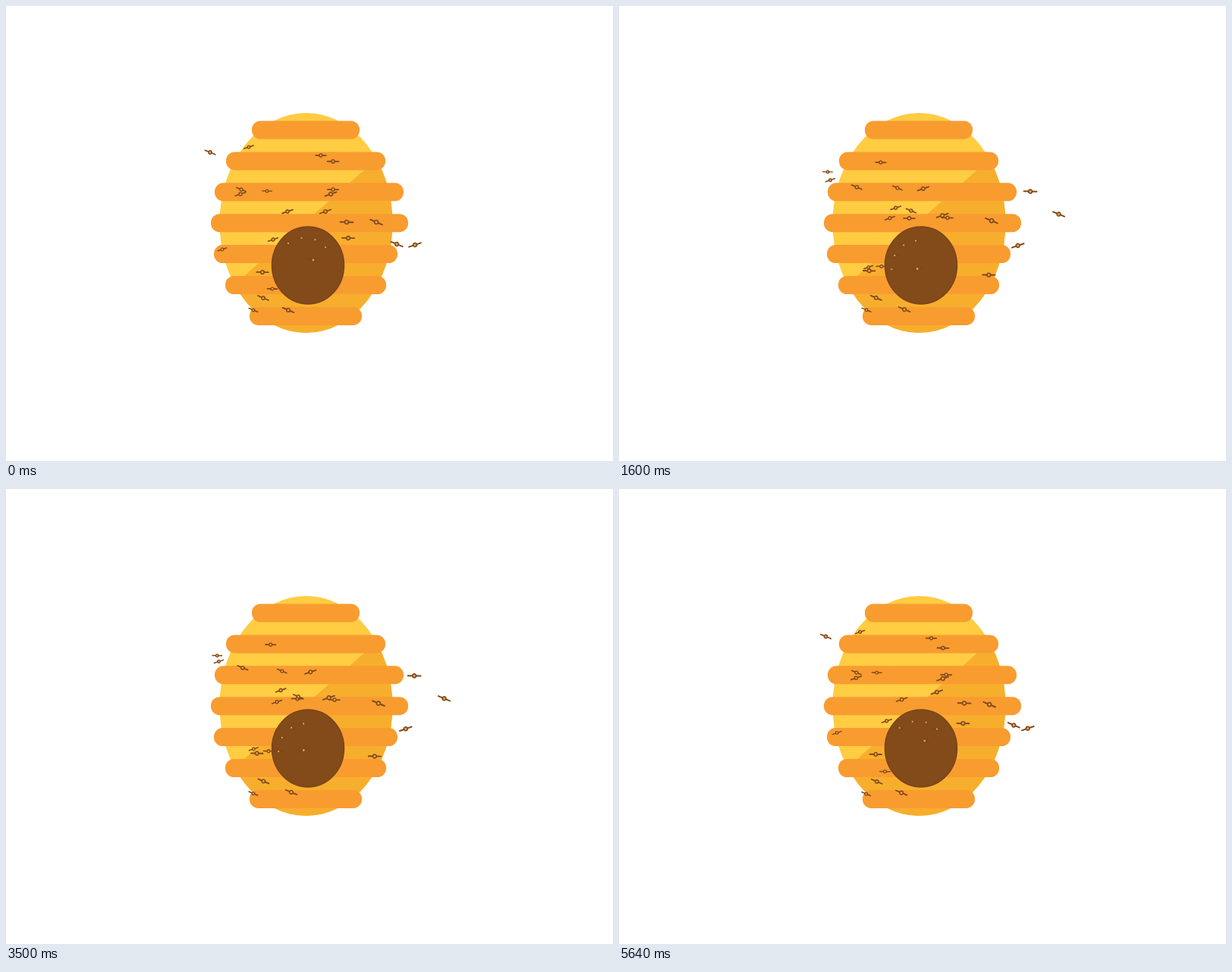
An HTML page with a canvas that plays this animation: 800x600 px, repeating every 5.66 s.

```html
<!DOCTYPE html>
<html lang="en">
<head>
<meta charset="utf-8">
<title>Beehive</title>
<style>
  html, body { margin: 0; width: 100%; height: 100%; overflow: hidden; background: #fff; }
  canvas { display: block; }
</style>
</head>
<body>
<canvas id="stage" width="800" height="600"></canvas>
<script>
const ctx = document.getElementById('stage').getContext('2d');
const LOOP = 5660, LAPS = 3, STEP = 20, TAU = Math.PI * 2;
const BROWN = '#7f4819';
const TILTS = [0.4, 0.02, -0.33];

// Left and right end of each band, from top to bottom.
const bands = [[324, 466], [290, 500], [275, 524], [270, 530], [274, 516], [289, 501], [321, 469]];

// Three points on each bee's orbit: at the start, 0.35 and 0.85 of a lap.
// Ordered from large to small; tilts repeat in threes.
const bees = [
  [488, 285, 486, 330, 491, 283], [449, 285, 449, 278, 541, 245], [539, 315, 498, 277, 526, 316],
  [515, 314, 453, 314, 579, 275], [451, 306, 448, 313, 487, 354], [428, 248, 496, 238, 426, 276],
  [372, 401, 373, 425, 376, 400], [338, 351, 281, 413, 330, 349], [421, 271, 467, 344, 401, 241],
  [339, 385, 291, 338, 339, 385], [431, 205, 481, 222, 383, 279], [371, 271, 362, 169, 393, 346],
  [269, 193, 230, 287, 313, 238], [431, 242, 426, 208, 433, 279], [309, 248, 319, 249, 364, 266],
  [405, 335, 464, 253, 385, 271], [415, 197, 349, 252, 346, 206], [352, 308, 323, 327, 357, 280],
  [310, 242, 357, 229, 366, 240], [351, 373, 364, 281, 346, 344], [320, 186, 295, 207, 279, 229],
  [326, 401, 341, 336, 326, 401], [344, 244, 329, 255, 276, 219], [285, 321, 327, 381, 328, 344]
];

function ellipse(x, y, rx, ry) {
  ctx.beginPath();
  ctx.ellipse(x, y, rx, ry, 0, 0, TAU);
}

function drawHive() {
  ctx.save();
  ellipse(395.5, 286, 114, 145);
  ctx.fillStyle = '#ffcc42';
  ctx.fill();
  ctx.clip();
  ctx.beginPath();
  ctx.moveTo(520, 174);
  ctx.lineTo(270, 395);
  ctx.lineTo(270, 440);
  ctx.lineTo(520, 440);
  ctx.fillStyle = '#f8ae2d';
  ctx.fill();
  ctx.restore();

  ctx.fillStyle = '#f89c30';
  bands.forEach(([left, right], i) => {
    ctx.beginPath();
    ctx.roundRect(left, 151.5 + i * 40.9, right - left, 24, 11.5);
    ctx.fill();
  });

  ellipse(398, 342, 47.5, 51);
  ctx.fillStyle = '#834a1a';
  ctx.fill();
  ctx.strokeStyle = '#7a4416';
  ctx.lineWidth = 1.5;
  ctx.stroke();
}

function drawBee(x, y, size, tilt) {
  ctx.save();
  ctx.translate(x, y);
  ctx.rotate(tilt);
  ctx.scale(size, size);
  ctx.strokeStyle = BROWN;
  ctx.lineCap = 'round';
  ctx.lineWidth = 2;
  ctx.beginPath();
  ctx.moveTo(-8.5, 0);
  ctx.lineTo(8.5, 0);
  ctx.stroke();
  ellipse(0, 0, 2.5, 2.5);
  ctx.fillStyle = '#e8a050';
  ctx.fill();
  ctx.lineWidth = 1.7;
  ctx.stroke();
  ctx.restore();
}

// Ellipse through three points; the last two lie on opposite sides.
function orbit(a, b, c, angle) {
  const mid = (b + c) / 2, u = a - mid, turn = 0.35 * TAU;
  const v = (b - mid - u * Math.cos(turn)) / Math.sin(turn);
  return mid + u * Math.cos(angle) + v * Math.sin(angle);
}

function draw(time) {
  const t = Math.floor(time % LOOP / STEP) * STEP;
  const angle = t / LOOP * LAPS * TAU;
  ctx.fillStyle = '#fff';
  ctx.fillRect(0, 0, 800, 600);
  drawHive();
  // Bees staying inside the entrance
  for (let i = 0; i < 4; i++) {
    const a = -2.3 + i * 0.5 + 1.2 * Math.sin(angle), r = 39 - i * 2;
    drawBee(398 + r * Math.cos(a), 342 + r * Math.sin(a), 0.7, 0);
  }
  bees.forEach(([ax, ay, bx, by, cx, cy], i) => {
    drawBee(orbit(ax, bx, cx, angle), orbit(ay, by, cy, angle), 1 - i * 0.012, TILTS[i % 3]);
  });
}

const start = performance.now();
function frame() {
  draw(performance.now() - start);
  requestAnimationFrame(frame);
}
frame();
</script>
</body>
</html>
```
